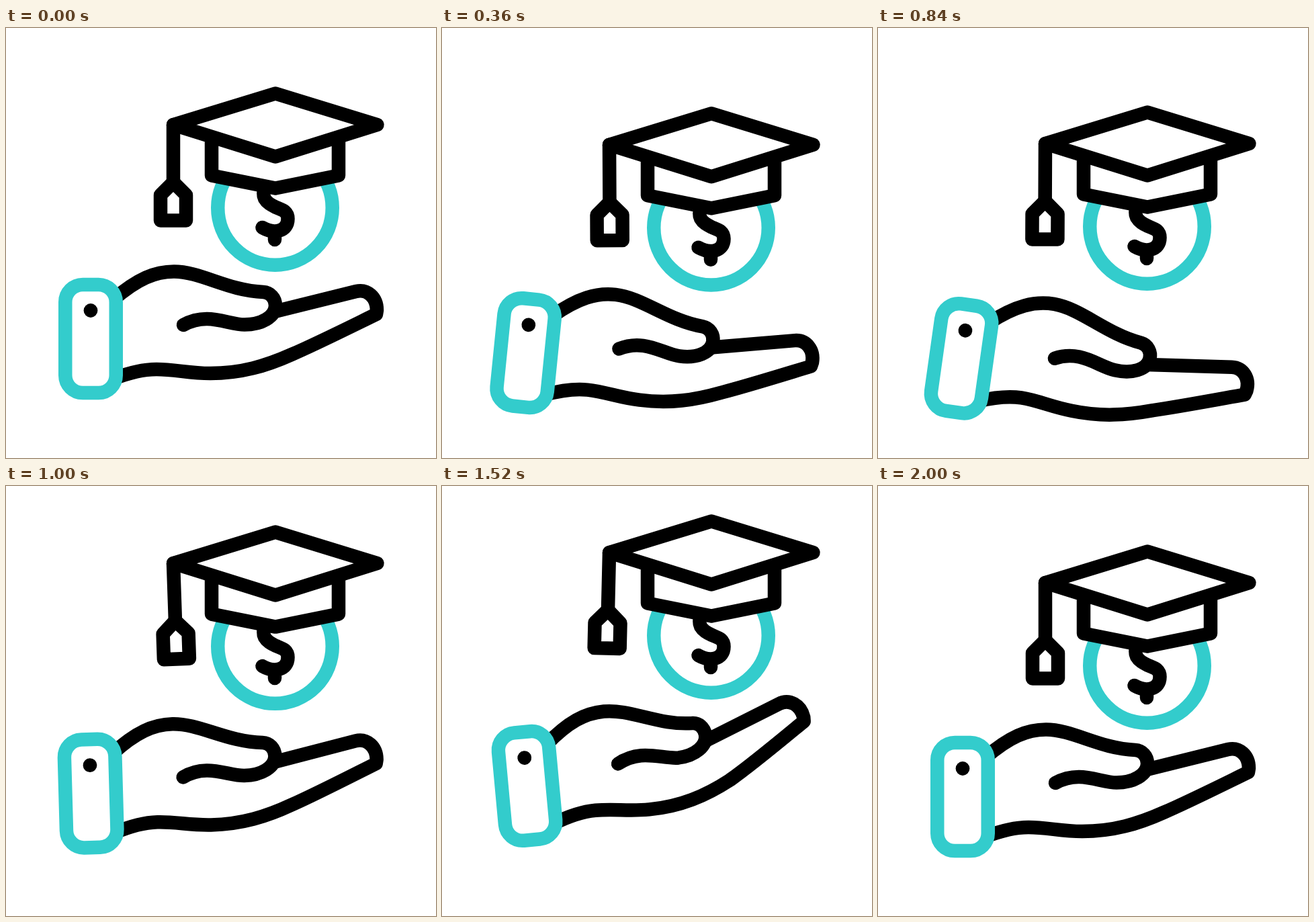
Recreate the animation shown at these times as an HTML page with a canvas. Size 640 by 640 pixels, loop 2.16 s.

```html
<!DOCTYPE html>
<html lang="en">
<head>
<meta charset="utf-8">
<title>Education funding</title>
<style>
  html, body { margin: 0; width: 100%; height: 100%; overflow: hidden; background: #fff; }
  canvas { display: block; width: 640px; height: 640px; }
</style>
</head>
<body>
<canvas id="stage" width="640" height="640"></canvas>
<script>
const ctx = document.getElementById('stage').getContext('2d');
const LOOP = 2160, STEP = 40, FINGER_LAG = 40, RAD = Math.PI / 180;
const TEAL = '#33cccc', BLACK = '#000';

// Keys are [time, value] pairs
const capKeys = [[80, 0], [650, 61], [660, 61], [1232, -79.5], [1280, -79.5], [1806, 0]];
const handKeys = [[74, 0], [640, 41.3], [660, 41.3], [1240, -28], [1270, -28], [1810, 0]];
const tasselKeys = [[80, 0], [260, -2.5], [560, 6], [990, -2], [1220, 2.7], [1820, 0]];

const thumb = 'M160 404 C196 373 222 362.5 250 362.5 C290 362.5 330 391 383 393 ' +
  'C393 393.5 401 402 401 413 C401 430 380 441.5 355 441.5 C330 441.5 300 422 264 442';
const palm = 'M400 422 L521 392 C538 388 552 401 552 420 L551 426 C508 447 460 471 425 486 ' +
  'C387 503 350 514 304 514 C272 514 252 508 224 508 C205 508 186 512 160 522';

// Symmetric cubic ease; k is the length of both handles
function ease(x, k) {
  let lo = 0, hi = 1;
  for (let i = 0; i < 24; i++) {
    const t = (lo + hi) / 2, r = 1 - t;
    if (3 * k * t * r * r + 3 * (1 - k) * t * t * r + t ** 3 < x) lo = t; else hi = t;
  }
  return lo * lo * (3 - 2 * lo);
}

function track(keys, time, k = 1 / 3) {
  const i = keys.findIndex(key => key[0] > time);
  if (i < 0) return keys[keys.length - 1][1];
  if (i === 0) return keys[0][1];
  const [t0, a] = keys[i - 1], [t1, b] = keys[i];
  return a + (b - a) * ease((time - t0) / (t1 - t0), k);
}

// Bends a point around the wrist, with an extra fold from the knuckles on
function bend(x, y, pose) {
  const len = x - 126, off = y - 462.5, reach = len * pose.stretch;
  const ramp = 460 - pose.knuckle;
  const u = Math.min(1, Math.max(0, (x - pose.knuckle) / ramp));
  const fold = ramp / 2 * u * u + Math.max(0, x - 460);
  const mean = (pose.wrist + pose.fold * fold / len) * RAD;
  const angle = (pose.wrist + pose.fold * u) * RAD;
  return [
    126 + pose.dx + reach * Math.cos(mean) - off * Math.sin(angle),
    462.5 + pose.dy + reach * Math.sin(mean) + off * Math.cos(angle)
  ];
}

const bendPath = (d, pose) => new Path2D(
  d.replace(/([\d.]+) ([\d.]+)/g, (_, x, y) => bend(+x, +y, pose).join(' ')));

function draw(d, color = BLACK, fill) {
  const path = typeof d === 'string' ? new Path2D(d) : d;
  if (fill) {
    ctx.fillStyle = fill;
    ctx.fill(path);
  }
  ctx.strokeStyle = color;
  ctx.stroke(path);
}

function circle(x, y, r) {
  const path = new Path2D();
  path.arc(x, y, r, 0, 2 * Math.PI);
  return path;
}

function handPose(time) {
  const dy = track(handKeys, time, 0.5);
  const late = track(handKeys, time - FINGER_LAG, 0.5);
  const amount = v => v / (v > 0 ? 38.5 : 27.5);
  const h = amount(dy), f = amount(late);
  return {
    dy,
    dx: h > 0 ? -2.5 * h : -h,
    wrist: h * (h > 0 ? 10.5 : 9),
    fold: f * (f > 0 ? 9 : 11.5),
    knuckle: f > 0 ? 200 : 340,
    stretch: 1 - 0.012 * Math.max(0, h)
  };
}

function drawHand(pose) {
  draw(bendPath(palm, pose));
  draw(bendPath(thumb, pose));

  ctx.save();
  ctx.translate(126 + pose.dx, 462.5 + pose.dy);
  ctx.rotate(pose.wrist * RAD);
  const cuff = new Path2D();
  cuff.roundRect(-37.75, -80.5, 75.5, 161, 26);
  draw(cuff, TEAL, '#fff');
  ctx.fillStyle = BLACK;
  ctx.fill(circle(0, -42, 10.4));
  ctx.restore();
}

function drawCap(dy, swing) {
  ctx.save();
  ctx.translate(0, dy);
  draw(circle(400.5, 267.5, 85.25), TEAL);
  draw('M306 168 V219.5 L401 238.5 L495 219.5 V168', BLACK, '#fff');
  draw('M387 237 C382 243 383 250 385 254 C389 261 396 264 402 267 ' +
    'C412 271 419.5 273 419.5 284 C419.5 303 399 307 381.5 297 M400 304 V315');
  draw('M249 144 L401 97.5 L552.5 144 L401 191.5 Z', BLACK, '#fff');

  ctx.translate(249, 144);
  ctx.rotate(swing * RAD);
  draw('M0 0 V86');
  draw('M0 85.5 L19 104.5 V142.5 H-19 V104.5 Z', BLACK, '#fff');
  ctx.restore();
}

function frame(now) {
  const time = Math.floor(now % LOOP / STEP) * STEP;
  ctx.clearRect(0, 0, 640, 640);
  ctx.lineWidth = 20.5;
  ctx.lineCap = ctx.lineJoin = 'round';
  drawHand(handPose(time));
  drawCap(track(capKeys, time), track(tasselKeys, time));
  requestAnimationFrame(frame);
}

frame(performance.now());
</script>
</body>
</html>
```
